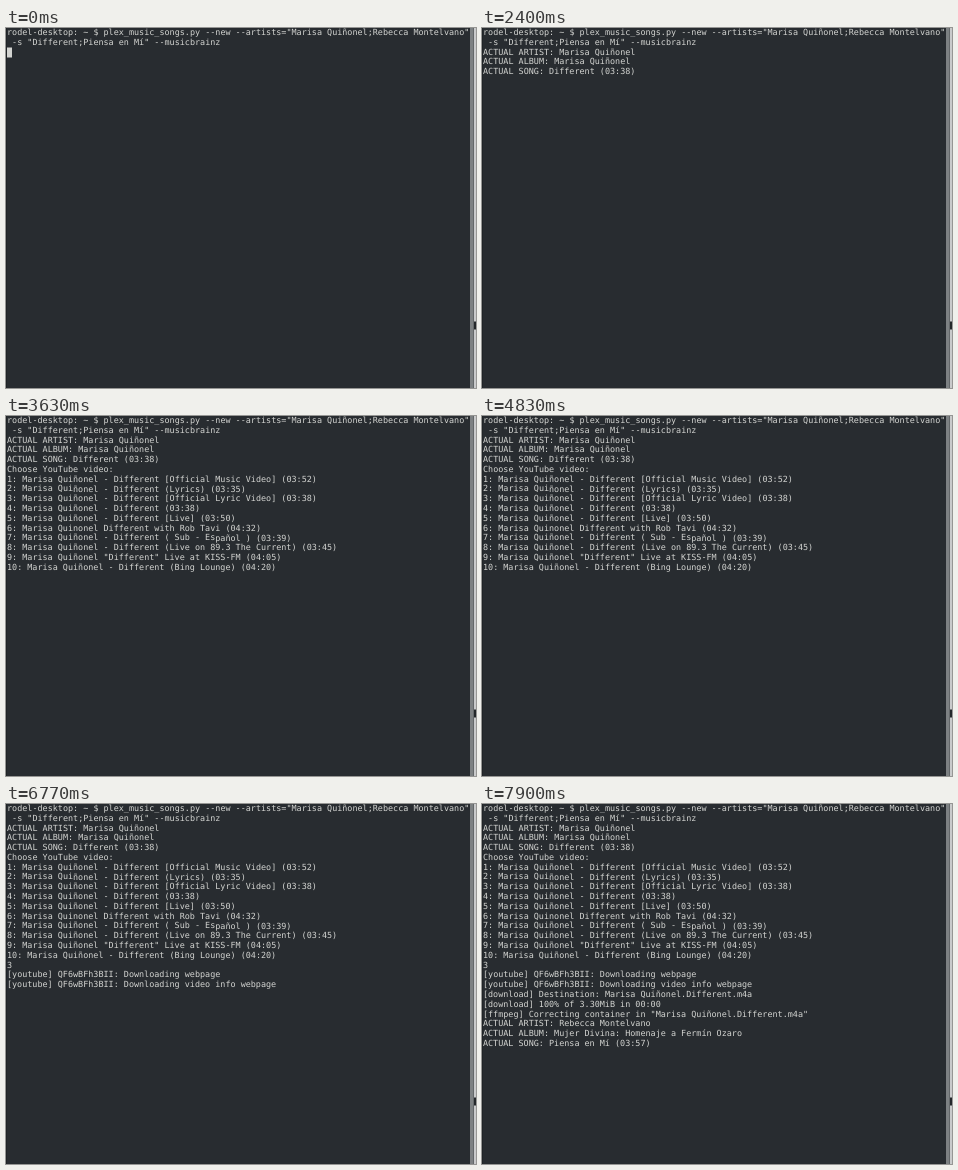
Write an HTML page that moves like this. It is 470 px wide and 360 px high and loops after 8 s.

```html
<!DOCTYPE html>
<html lang="en">
<head>
<meta charset="utf-8">
<title>Terminal session</title>
<style>
  html, body { margin: 0; width: 100%; height: 100%; overflow: hidden; background: #282c30; }
  #stage { position: relative; width: 470px; height: 360px; overflow: hidden; background: #282c30; }
  /* The hair of rotation lets glyphs and cursor sit between pixel rows. */
  #screen {
    position: absolute; left: .6px; top: -.25px; width: 464px; height: 360px; color: #d3d4d1;
    font: 8.45px/9.79px "DejaVu Sans Mono", monospace;
    text-rendering: geometricPrecision; font-variant-ligatures: none;
    transform: rotate(.02deg); transform-origin: 150px 80px;
  }
  #screen div { position: absolute; left: 0; top: 0; white-space: pre; }
  #cursor { width: 5px; height: 9.7px; background: #d3d4d1; }
  .edge { position: absolute; top: 0; height: 360px; }
  .left { left: 0; width: 1px; background: #202427; }
  .bar { left: 464px; width: 3px; background: #7d8183; }
  .gap { left: 467px; width: 1px; background: #64686a; }
  .desk { left: 468px; width: 2px; background: linear-gradient(#c9cacb 293px, #24282b 294px 301px, #c9cacb 302px); }
</style>
</head>
<body>
<div id="stage">
  <i class="edge left"></i><i class="edge bar"></i><i class="edge gap"></i><i class="edge desk"></i>
  <div id="screen"><div id="cursor"></div></div>
</div>
<script>
const LOOP = 8000, ROW = 9.79, COL = 5.087;
const SINGER = "Marisa Quiñonel", GUEST = "Rebecca Montelvano";
const SONG = SINGER + " - Different";
const PROGRESS = 20;

const lines = [
  `rodel-desktop: ~ $ plex_music_songs.py --new --artists="${SINGER};${GUEST}"`,
  ` -s "Different;Piensa en Mí" --musicbrainz`,
  `ACTUAL ARTIST: ${SINGER}`,
  `ACTUAL ALBUM: ${SINGER}`,
  `ACTUAL SONG: Different (03:38)`,
  `Choose YouTube video:`,
  `1: ${SONG} [Official Music Video] (03:52)`,
  `2: ${SONG} (Lyrics) (03:35)`,
  `3: ${SONG} [Official Lyric Video] (03:38)`,
  `4: ${SONG} (03:38)`,
  `5: ${SONG} [Live] (03:50)`,
  `6: Marisa Quinonel Different with Rob Tavi (04:32)`,
  `7: ${SONG} ( Sub - Español ) (03:39)`,
  `8: ${SONG} (Live on 89.3 The Current) (03:45)`,
  `9: ${SINGER} "Different" Live at KISS-FM (04:05)`,
  `10: ${SONG} (Bing Lounge) (04:20)`,
  `3`,
  `[youtube] QF6wBFh3BII: Downloading webpage`,
  `[youtube] QF6wBFh3BII: Downloading video info webpage`,
  `[download] Destination: ${SINGER}.Different.m4a`,
  `[download] 100% of 3.30MiB in 00:00`,
  `[ffmpeg] Correcting container in "${SINGER}.Different.m4a"`,
  `ACTUAL ARTIST: ${GUEST}`,
  `ACTUAL ALBUM: Mujer Divina: Homenaje a Fermín Ozaro`,
  `ACTUAL SONG: Piensa en Mí (03:57)`
];

const progress = (pct, rate) =>
  `[download] ${pct.toFixed(1).padStart(5)}% of 3.30MiB at ${rate.toFixed(2).padStart(5)}MiB/s ETA 00:00`;

// [start ms, visible lines, cursor shown, text of an unfinished last line]
const steps = [
  [0, 2, 1],
  [630, 5, 1], [1200, 5, 0], [1800, 5, 1], [2400, 5, 0],
  [2600, 16, 0], [3000, 16, 1], [3630, 16, 0], [4200, 16, 1], [4830, 16, 0], [5430, 16, 1],
  [5730, 17, 1, "3"], [5870, 17, 1],
  [6170, 18, 1], [6430, 18, 0], [6770, 19, 0], [7030, 19, 1],
  [7300, 20, 1],
  [7330, 21, 1, progress(0.9, 2.31)],
  [7370, 21, 1, progress(3.8, 3.74)],
  [7400, 21, 1, progress(7.5, 4.62)],
  [7430, 21, 1, progress(15.1, 5.48)],
  [7470, 21, 1, progress(30.3, 6.26)],
  [7500, 21, 1, progress(60.6, 7.12)],
  [7530, 21, 1, progress(100, 7.85)],
  [7600, 22, 1],
  [7900, 25, 0]
];

const screen = document.getElementById("screen");
const cursor = document.getElementById("cursor");
const place = (el, col, row) => el.style.transform = `translate(${col * COL}px, ${row * ROW}px)`;

const rows = lines.map((text, i) => {
  const row = document.createElement("div");
  row.textContent = text;
  place(row, 0, i);
  return screen.appendChild(row);
});

function show([, count, lit, live]) {
  rows.forEach((row, i) => row.style.visibility = i < count ? "visible" : "hidden");
  rows[PROGRESS].textContent = count === PROGRESS + 1 ? live : lines[PROGRESS];
  // An unfinished line keeps the cursor at its end.
  if (live) place(cursor, live.length, count - 1);
  else place(cursor, 0, count);
  cursor.style.visibility = lit ? "visible" : "hidden";
}

const begin = performance.now();
let current;
function tick() {
  const t = (performance.now() - begin) % LOOP;
  const step = steps.findLast(s => s[0] <= t);
  if (step !== current) show(current = step);
  requestAnimationFrame(tick);
}
tick();
</script>
</body>
</html>
```
